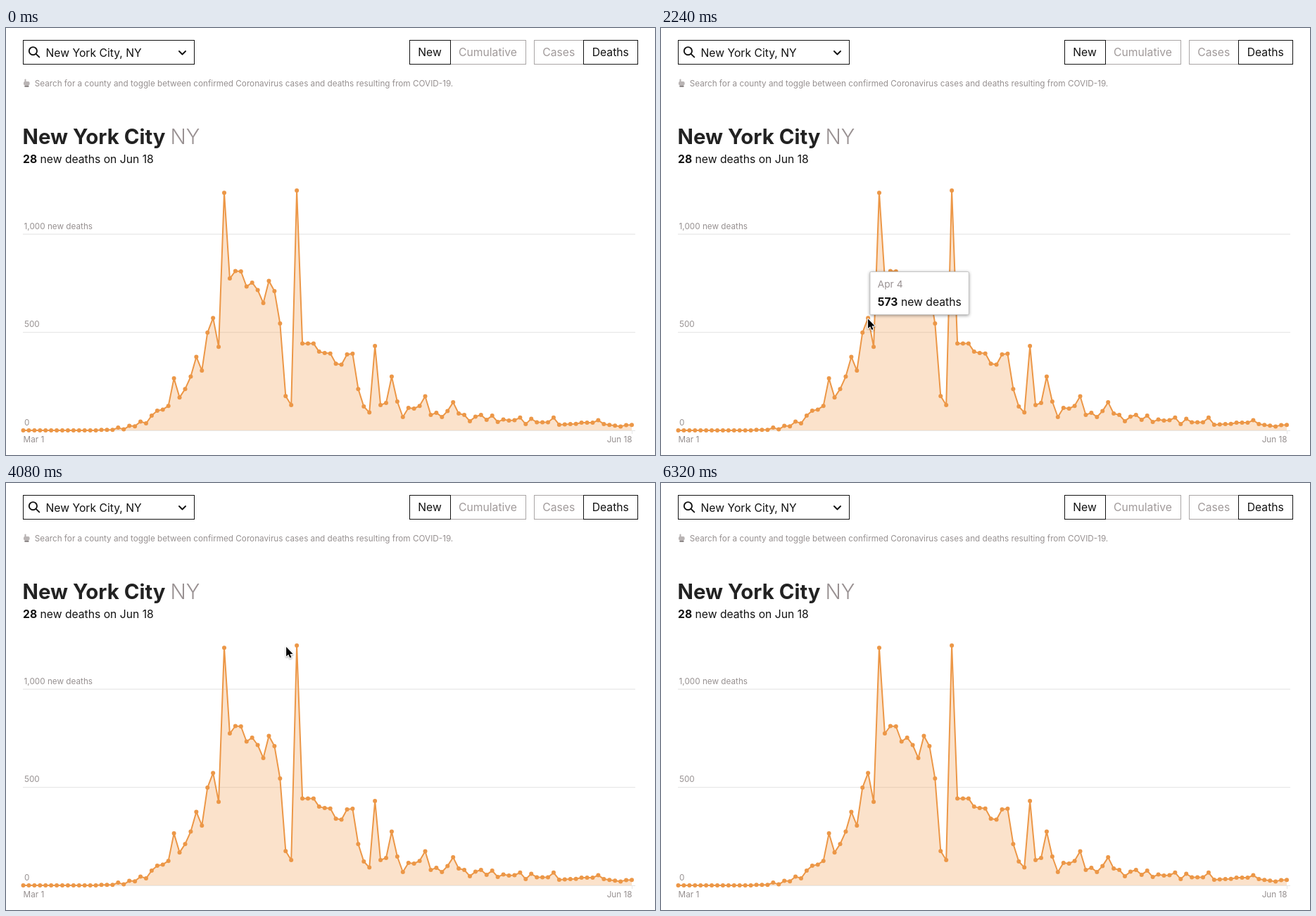
Animation of 922 by 607 pixels, one loop 6640 ms. Source, as an HTML page:

```html
<!DOCTYPE html>
<html lang="en">
<head>
<meta charset="utf-8">
<title>New deaths by day</title>
<style>
  html, body { margin: 0; width: 100%; height: 100%; overflow: hidden; background: #fff; }
  svg { display: block; width: 922px; height: 607px; font-family: Inter, sans-serif; font-size: 15.7px; fill: #121212; }
  .small { font-size: 11.73px; fill: #969090; }
  .title { font-size: 29.4px; font-weight: 700; fill: #222; }
  .state { font-weight: 300; fill: #999192; }
  .bold { font-weight: 700; }
  .gray { fill: #a09a9a; }
  .mid { text-anchor: middle; }
  .box { fill: #fff; stroke: #121212; }
  .off { stroke: #aaa6a6; }
  .icon { fill: none; stroke: #121212; stroke-width: 1.9; stroke-linecap: round; stroke-linejoin: round; }
  .grid { stroke: #e8e8e8; stroke-width: 1.2; }
  .area { fill: #ef9745; fill-opacity: .28; }
  .line { fill: none; stroke: #ec9747; stroke-width: 2; stroke-linejoin: round; }
  .dots { fill: #ec9747; }
  #card { fill: #fff; stroke: #bbb; stroke-width: .8; filter: drop-shadow(0 1px 2px rgba(0,0,0,.4)); }
  #date { font-size: 13.73px; fill: #999192; }
  #cursor { filter: drop-shadow(0 1px 1px rgba(0,0,0,.35)); }
  #cursor path { fill: #000; stroke: #fff; stroke-width: 2; stroke-linejoin: round; paint-order: stroke; }
</style>
</head>
<body>
<svg viewBox="0 0 922 607">
  <rect class="box" x="24.5" y="17.5" width="243" height="34"/>
  <g class="icon">
    <circle cx="38.4" cy="32.7" r="5.6"/>
    <path d="M42.6 36.9L47.3 41.4"/>
    <path d="M246 33L250.5 37.5 255 33"/>
  </g>
  <text x="56.5" y="41">New York City, NY</text>

  <rect class="box off" x="631.5" y="17.5" width="107" height="34"/>
  <rect class="box" x="573.5" y="17.5" width="58" height="34"/>
  <rect class="box off" x="750.5" y="17.5" width="70" height="34"/>
  <rect class="box" x="820.5" y="17.5" width="77" height="34"/>
  <g class="mid">
    <text x="602" y="40">New</text>
    <text x="684.5" y="40" class="gray">Cumulative</text>
    <text x="785.3" y="40" class="gray">Cases</text>
    <text x="858.8" y="40">Deaths</text>
  </g>

  <g fill="#b9b4b4">
    <rect x="26.4" y="72.6" width="2.2" height="7" rx="1.1"/>
    <rect x="25" y="76" width="8.6" height="5.4" rx="2"/>
    <rect x="26.4" y="81.6" width="6" height="2.4" rx=".6" fill="#8f8a8a"/>
  </g>
  <text class="small" x="40.7" y="82.7">Search for a county and toggle between confirmed Coronavirus cases and deaths resulting from COVID-19.</text>

  <text class="title" x="23.5" y="164.8">New York City</text>
  <text class="title state" x="233.4" y="164.8">NY</text>
  <text x="24" y="192"><tspan class="bold">28</tspan> new deaths on Jun 18</text>

  <path class="grid" d="M24 293.2H894M24 432.6H894M24 572.3H894M889.5 572V577"/>
  <g id="chart"></g>
  <g class="small">
    <text x="25.6" y="285.6">1,000 new deaths</text>
    <text x="26" y="425">500</text>
    <text x="26" y="564.8">0</text>
    <text x="24.6" y="589">Mar 1</text>
    <text x="889.5" y="589" text-anchor="end">Jun 18</text>
  </g>

  <g id="tip">
    <rect id="card" height="61" rx="1.5"/>
    <text id="date" x="10.8" y="22"></text>
    <text id="info" x="10.8" y="48"><tspan id="count" class="bold"></tspan> new deaths</text>
  </g>
  <g id="cursor"><path d="M.6 1V14.6L3.7 11.7 5.8 16.6 8 15.7 5.9 10.9H10.1Z"/></g>
</svg>
<script>
const LOOP = 6640, STEP = 80;
const $ = id => document.getElementById(id);

// n days from v, changing by d a day
const run = (n, v, d = 0) => Array.from({ length: n }, (_, k) => v + d * k);
const rise = [14, 5, 23, 21, 45, 36, 75, 100, 106, 125, 265, 168, 211, 274,
  375, 305, 498, 573, 426];
const peak = [1211, 774, 812, 810, 733, 753, 715, 649, 762, 710, 545, 175, 129, 1222];
const fall = [401, 394, 392, 340, 335, 387, 391, 211, 122, 91, 430, 129, 140, 274,
  147, 68, 115, 111, 125, 174, 79, 90, 68, 99, 143, 86, 79];
const tail = [47, 70, 79, 54, 75, 43, 56, 50, 52, 65, 32, 59];
const counts = [...run(14, 0), ...run(3, 3), ...rise, ...peak, ...run(3, 443), ...fall, ...tail,
  ...run(3, 41), 65, ...run(4, 29, 1.5), ...run(3, 39), 52, ...run(4, 32, -4), 27, 28];
const px = i => 24.5 + i * 7.931;
const py = i => 572 - counts[i] * 0.279;

// Pointer path: time, x, y and the day hovered until the next key
const path = [
  [80, 7, 577], [400, 20, 572, 0], [700, 20, 572], [1120, 210.5, 504], [1360, 408, 452],
  [1600, 237, 500, 27], [1680, 232.5, 496.5, 27], [1830, 232.5, 496.5],
  [2240, 293.5, 412.5, 34], [2500, 293.5, 412], [2760, 282, 350],
  [3200, 308.5, 232, 36], [3520, 308.5, 232, 36], [3560, 310, 232],
  [4160, 411, 232, 49], [4520, 411, 232], [4640, 510, 275], [4800, 738.5, 418.5],
  [5040, 830, 522], [5280, 844, 554, 103], [5800, 843, 555], [6080, 926, 535]
];

const points = counts.map((_, i) => px(i).toFixed(1) + ',' + py(i).toFixed(1));
$('chart').innerHTML =
  `<path class="area" d="M24.5,572L${points.join('L')}V572Z"/>` +
  `<path class="line" d="M${points.join('L')}"/><g class="dots">` +
  counts.map((_, i) => `<circle cx="${px(i)}" cy="${py(i)}" r="3"/>`).join('') + '</g>';
const dots = document.querySelectorAll('.dots circle');

const show = (el, on) => el.setAttribute('visibility', on ? 'visible' : 'hidden');
const move = (el, x, y) => el.setAttribute('transform', `translate(${x} ${y})`);

function pointer(t) {
  const k = path.findIndex(p => p[0] > t);
  if (k < 1) return {};
  const [t0, x0, y0, day] = path[k - 1], [t1, x1, y1] = path[k];
  const f = (t - t0) / (t1 - t0);
  return { pos: [x0 + (x1 - x0) * f, y0 + (y1 - y0) * f], day };
}

function drawTip(i) {
  const date = new Date(2020, 2, 1 + i);
  $('date').textContent = date.toLocaleDateString('en-US', { month: 'short', day: 'numeric' });
  $('count').textContent = counts[i].toLocaleString('en-US');
  const w = $('info').getComputedTextLength() + 21.4;
  $('card').setAttribute('width', w);
  const x = px(i) + w > 890 ? px(i) + 1 - w : px(i) + 2.8;
  move($('tip'), x, py(i) - 65.6);
}

function draw(ms) {
  const t = Math.floor(ms % LOOP / STEP) * STEP;
  const { pos, day } = pointer(t);
  show($('cursor'), pos);
  if (pos) move($('cursor'), ...pos);

  const hover = day !== undefined;
  show($('tip'), hover);
  if (hover) drawTip(day);
  // the dot swells one step after its label appears
  const big = hover && pointer(t - STEP).day === day;
  dots.forEach((dot, i) => dot.setAttribute('r', big && i === day ? 4.7 : 3));
}

const start = performance.now();
function tick() {
  draw(performance.now() - start);
  requestAnimationFrame(tick);
}
tick();
</script>
</body>
</html>
```
